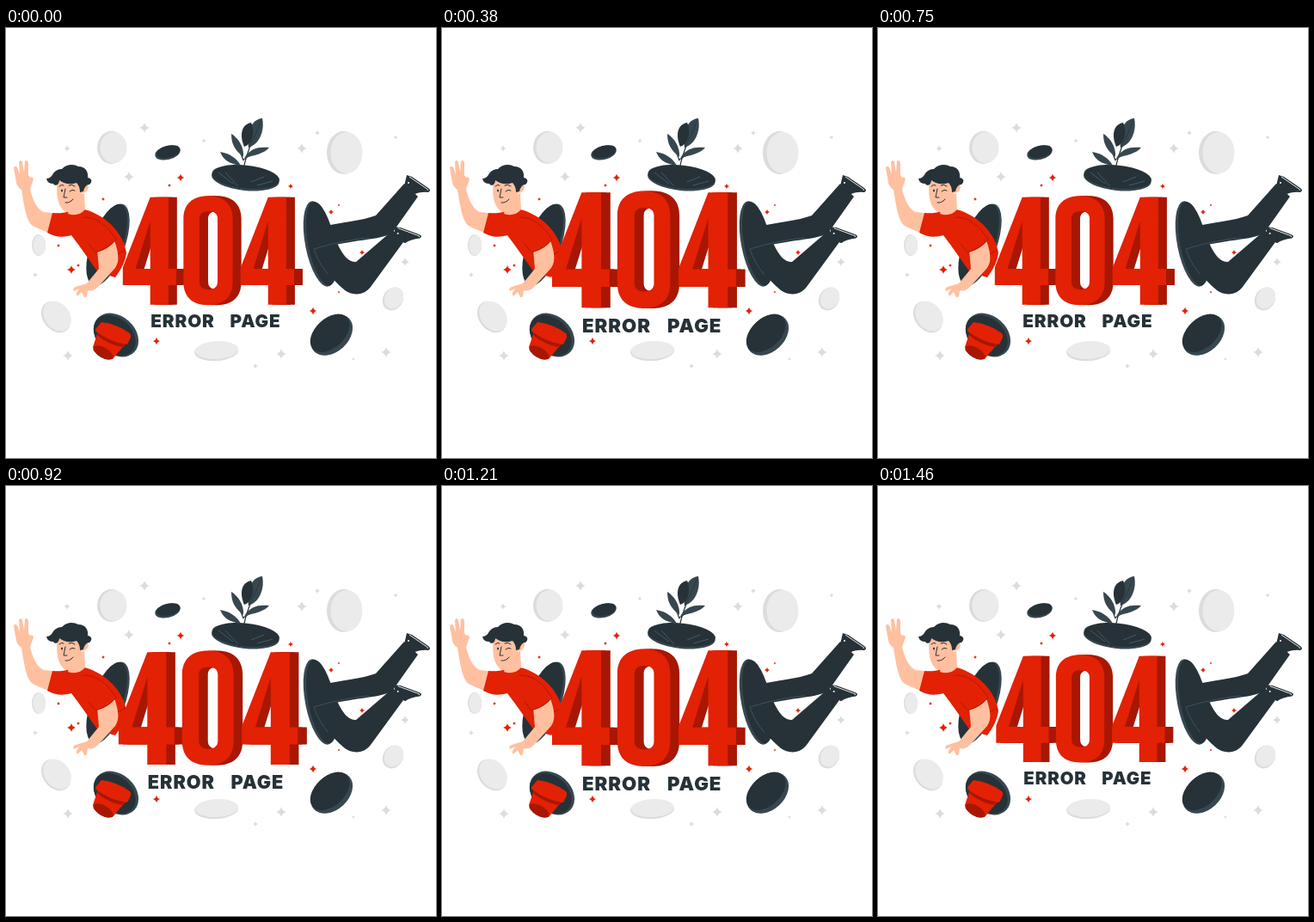
Recreate the animation shown at these times as an HTML page without scripts. Size 500 by 500 pixels, loop 1.5 s.

```html
<!DOCTYPE html>
<html lang="en">
<head>
<meta charset="utf-8">
<title>404 error page</title>
<style>
  html, body { margin: 0; width: 100%; height: 100%; overflow: hidden; background: #fff; }
  svg { display: block; width: 100%; height: 100%; }
  .red { fill: #e32104; }
  .maroon { fill: #a81703; }
  .dark { fill: #263238; }
  .slate { fill: #37474f; }
  .skin { fill: #ffc0a0; }
  .pale { fill: #ebebeb; }
  .shade { fill: #dcdcdc; }
  .line { fill: none; stroke: #263238; stroke-linecap: round; stroke-linejoin: round; }
  .caption { font: 900 20.6px Inter, "Open Sans", sans-serif; letter-spacing: .9px; }
  .pulse { transform-origin: 240px 272px; animation: pulse 750ms linear infinite; }
  @keyframes pulse {
    0%, 100% { transform: scale(1.004); }
    17.3% { transform: scale(1.047); }
    44% { transform: scale(1.068); }
    50.7% { transform: scale(1.078); }
    58% { transform: scale(1.087); }
    77.3% { transform: scale(1.038); }
    95% { transform: scale(.988); }
  }
</style>
</head>
<body>
<svg viewBox="0 0 500 500">
  <defs>
    <path id="star" d="M0-1Q.2-.2 1 0Q.2.2 0 1Q-.2.2-1 0Q-.2-.2 0-1Z"/>
    <path id="four" fill-rule="evenodd" d="M136 279L168 197H189V280H198V299H189V321.500H168V299H136ZM168 280V225L151 280Z"/>
    <path id="zero" fill-rule="evenodd" d="M206.500 222C206.500 205 217 195.500 235 195.500S263.500 205 263.500 222V295C263.500 313 253 322 235 322S206.500 313 206.500 295ZM225 222V295C225 301 229 304 235.500 304S246 301 246 295V222C246 216 242 213.500 235.500 213.500S225 216 225 222Z"/>
    <g id="shoe">
      <path class="dark" d="M0 14L3 1L9 3L28 16Q32 19 28 21Q18 20 11 24Z"/>
      <path fill="none" stroke="#fff" stroke-width=".9" d="M6 3L25 16Q29 18 27 19"/>
      <circle cx="5" cy="10" r="1" fill="#fff"/>
    </g>
  </defs>

  <g class="shade">
    <ellipse cx="122.500" cy="139" rx="16.500" ry="19"/>
    <ellipse cx="392.500" cy="145" rx="19.500" ry="25"/>
    <ellipse cx="38" cy="252.500" rx="8" ry="12.500"/>
    <ellipse cx="58" cy="336" rx="15" ry="20" transform="rotate(-38 58 336)"/>
    <ellipse cx="450" cy="315" rx="11.500" ry="14" transform="rotate(30 450 315)"/>
    <ellipse cx="244.500" cy="376" rx="25.500" ry="11" transform="rotate(-3 244.500 376)"/>
  </g>
  <g class="pale">
    <ellipse cx="125" cy="139" rx="15.500" ry="18"/>
    <ellipse cx="396" cy="145" rx="18.500" ry="24"/>
    <ellipse cx="39" cy="252.500" rx="7.500" ry="12"/>
    <ellipse cx="59.500" cy="335" rx="14.500" ry="19" transform="rotate(-38 59.500 335)"/>
    <ellipse cx="451" cy="314" rx="10.500" ry="13" transform="rotate(30 451 314)"/>
    <ellipse cx="245" cy="374.500" rx="25" ry="10.500" transform="rotate(-3 245 374.500)"/>
  </g>

  <g class="shade">
    <use href="#star" transform="translate(161 116) scale(6)"/>
    <use href="#star" transform="translate(143 173) scale(6)"/>
    <use href="#star" transform="translate(71 140) scale(3.500)"/>
    <use href="#star" transform="translate(230 131) scale(2.500)"/>
    <use href="#star" transform="translate(344 140) scale(6)"/>
    <use href="#star" transform="translate(362 122) scale(3)"/>
    <use href="#star" transform="translate(453 127) scale(2.500)"/>
    <use href="#star" transform="translate(464 272) scale(5)"/>
    <use href="#star" transform="translate(72 381) scale(6)"/>
    <use href="#star" transform="translate(34 287) scale(3)"/>
    <use href="#star" transform="translate(290 393) scale(3)"/>
    <use href="#star" transform="translate(320 379) scale(6)"/>
    <use href="#star" transform="translate(442 377) scale(6)"/>
    <use href="#star" transform="translate(404 385) scale(2)"/>
  </g>
  <g class="red">
    <use href="#star" transform="translate(203 174) scale(4.500)"/>
    <use href="#star" transform="translate(190 183) scale(2)"/>
    <use href="#star" transform="translate(331 184) scale(3)"/>
    <use href="#star" transform="translate(378 214) scale(3)"/>
    <use href="#star" transform="translate(387 206) scale(1.500)"/>
    <use href="#star" transform="translate(387 307) scale(1.500)"/>
    <use href="#star" transform="translate(61 253) scale(2)"/>
    <use href="#star" transform="translate(76 281) scale(5)"/>
    <use href="#star" transform="translate(84 276) scale(2)"/>
    <use href="#star" transform="translate(113 199) scale(2)"/>
    <use href="#star" transform="translate(357 329) scale(4.500)"/>
    <use href="#star" transform="translate(414 261) scale(3)"/>
    <use href="#star" transform="translate(175 364) scale(4)"/>
  </g>

  <!-- loose discs -->
  <g transform="rotate(-14 188 145)">
    <ellipse class="slate" cx="188" cy="145" rx="15" ry="8"/>
    <ellipse class="dark" cx="189" cy="144" rx="14" ry="7"/>
  </g>
  <g transform="rotate(-43 378 357)">
    <ellipse class="slate" cx="378.500" cy="357.500" rx="28" ry="19.500"/>
    <ellipse class="dark" cx="378.500" cy="354.500" rx="27" ry="17"/>
  </g>

  <!-- plant -->
  <g transform="rotate(6 278 174)">
    <ellipse class="slate" cx="278.500" cy="175" rx="39.500" ry="14"/>
    <ellipse class="dark" cx="278.500" cy="173" rx="39.500" ry="13.500"/>
  </g>
  <path fill="none" stroke="#455a64" d="M247 168L264 181M255 168L270 184M285 179L300 173M292 183L310 178"/>
  <path class="line" stroke-width="1.200" d="M271 187C276 166 278 148 287 131M274 161Q265 155 259 150M276 154Q270 138 265 128M276 153Q287 146 294 142"/>
  <g class="slate">
    <path d="M282 139C279 120 286 106 298 105C301 119 295 135 282 139Z"/>
    <path d="M277 151C285 140 292 138 306 139C300 146 290 148 277 151Z"/>
    <path d="M273 160C260 158 253 154 249 144C260 146 268 151 273 160Z"/>
    <path d="M276 150C266 142 262 135 262 123C270 128 277 138 276 150Z"/>
  </g>
  <path class="dark" d="M277 138C271 124 274 112 285 110C290 121 286 135 277 138Z"/>
  <path fill="none" stroke="#263238" stroke-width=".7" d="M282 139Q291 124 297 107"/>

  <!-- upturned pot -->
  <g transform="rotate(42 128 357)">
    <ellipse class="slate" cx="128" cy="357" rx="29" ry="22"/>
    <ellipse class="dark" cx="127" cy="358.500" rx="27.500" ry="20"/>
  </g>
  <path class="red" d="M108 350L101 371Q109 384 124 385L140 366Z"/>
  <path class="maroon" d="M107 353Q121 364 138 367L135 371Q117 367 106 357Z"/>
  <ellipse class="maroon" cx="113" cy="377.500" rx="13" ry="6" transform="rotate(30 113 377.500)"/>
  <path class="red" d="M111 342Q129 344 144 355Q146 357 145 360L141 368Q120 365 105 353Q103 351 105 349Z"/>

  <!-- portals -->
  <g transform="rotate(20 119 252)">
    <ellipse class="slate" cx="119" cy="252" rx="19" ry="50"/>
    <ellipse class="dark" cx="117" cy="252" rx="18" ry="49"/>
  </g>
  <g transform="rotate(-11 365 251)">
    <ellipse class="slate" cx="365" cy="251" rx="17" ry="50.500"/>
    <ellipse class="dark" cx="367" cy="251" rx="15.500" ry="49.500"/>
  </g>

  <!-- legs -->
  <use href="#shoe" x="463" y="170"/>
  <use href="#shoe" transform="translate(449 231) rotate(-10) scale(1.050 .9)"/>
  <path class="dark" d="M357 251L385 250C392 265 398 272 407 272L450 235L462 249L424 301C416 312 402 311 394 305C377 291 362 272 357 251Z"/>
  <path class="dark" d="M360 232C390 226 414 224 430 218L463 181L479 196L450 237C443 244 424 245 400 249L358 256Z"/>
  <path fill="none" stroke="#455a64" stroke-width=".8" d="M358 257Q390 247 422 244M358 257Q363 273 375 287"/>

  <!-- waving man -->
  <path class="skin" d="M18 188C11 183 12 178 11 174L9 163Q10 159 13 162L16 170L15 156Q17 152 19 156L21 168L22 155Q25 152 26 157L26 171L28 174Q31 172 32 176L28 187C31 200 36 211 44 214L72 217L66 242C52 239 40 235 31 230C23 224 21 205 18 188Z"/>
  <path class="red" d="M48 238L54 215C70 217 84 208 95 212C121 221 137 242 140 261C139 271 134 281 127 290L107 284C100 274 86 254 76 241C65 244 57 243 48 238Z"/>
  <path class="skin" d="M77 196L91 192L92 211Q84 220 72 216Z"/>
  <path class="skin" d="M60 174C58 191 59 208 70 214C80 215 87 202 88 192Q95 192 96 185Q95 180 89 182L84 171Z"/>
  <path class="dark" d="M47 175Q52 175 55 169Q59 164 65 164C70 158 79 158 84 161C93 161 96 168 95 174C101 175 100 180 97 182Q92 182 90 190L86 191Q86 184 82 180C73 183 66 180 62 177C62 182 57 185 55 181Q48 181 47 175Z"/>
  <path class="line" stroke-width="1" d="M62 184Q65 181 67 183M73 183Q77 181 80 184M74 190Q77 187 80 189M69 187L67 197L71 197M69 203Q74 204 78 199"/>
  <ellipse class="dark" cx="65" cy="189" rx="1" ry="1.600"/>
  <path class="skin" d="M106 257L126 247C130 259 133 270 127 279L107 301Q101 307 95 305L94 312Q91 315 90 311L88 307L84 311Q81 312 82 308L85 303L79 306Q77 303 81 301L94 297L108 280Z"/>
  <path class="red" d="M82 226C91 212 111 222 121 237L128 246C122 254 114 259 104 261Q91 248 82 226Z"/>
  <path fill="none" stroke="#a81703" stroke-width=".8" d="M90 220C108 220 120 233 128 246Q120 256 104 261L96 251M139 258L130 263"/>

  <!-- sign -->
  <g class="pulse">
    <g class="maroon">
      <use href="#four" x="5"/><use href="#four" x="10"/>
      <use href="#four" x="141.500"/><use href="#four" x="146.500"/>
    </g>
    <use class="red" href="#four"/>
    <g class="maroon"><use href="#zero" x="5"/><use href="#zero" x="10"/></g>
    <use class="red" href="#zero"/>
    <use class="red" href="#four" x="136.500"/>
    <text class="caption dark" x="168.500" y="348">ERROR</text>
    <text class="caption dark" x="260.500" y="348">PAGE</text>
  </g>
</svg>
</body>
</html>
```
